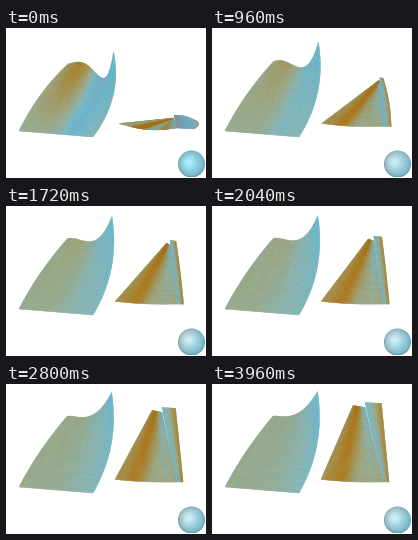
Recreate the animation shown at these times as a matplotlib script. Size 200x150 px, loop 4000 ms.

```python
import numpy as np
import matplotlib.pyplot as plt
from matplotlib.animation import FuncAnimation
from matplotlib.collections import PolyCollection
from matplotlib.patches import Circle

W, H = 200, 150
FRAMES, STEP = 100, 40
STOPS = [0, 0.25, 0.5, 0.75, 1, 1.5]
RAMP = np.array([(180, 124, 26), (170, 148, 76), (160, 174, 138),
                 (140, 187, 185), (108, 192, 217), (150, 155, 165)]) / 255


def shade(tone):
    return np.stack([np.interp(tone, STOPS, RAMP[:, c]) for c in range(3)], axis=-1)


def decay(t, tau):
    return np.exp(-t / tau)


def smooth(s):
    s = np.clip(s, 0, 1)
    return s * s * (3 - 2 * s)


def bump(x, width):
    return np.exp(-(x / width) ** 2)


def arc(top, mid, bottom, v):
    """Parabola through three points, at v = 0, 0.5 and 1."""
    weights = (2 * (v - 0.5) * (v - 1), 4 * v * (1 - v), 2 * v * (v - 0.5))
    return sum(w[..., None] * np.array(p) for w, p in zip(weights, (top, mid, bottom)))


def line(top, bottom, v):
    return arc(top, np.add(top, bottom) / 2, bottom, v)


def ruled(left, right, u):
    return left + (right - left) * u[..., None]


def cloth(u, v, t):
    d = decay(t, 1100)
    left = arc((61 + d, 32 + 4 * d), (34.5, 67), (13, 103), v)
    right = arc((105.5 + 2 * d, 7 + 17 * d), (105 + 2 * d, 60 + 8 * d), (87, 109), v)
    xy = ruled(left, right, u)
    sag = (45 + 230 * d) * u ** (1.2 + 2.6 * d) * (1 - u)
    xy[..., 1] += sag * (1 - v) ** 1.5
    ripple = 0.45 * bump(u - 0.7, 0.15) - 0.5 * (1 - v) * bump(u - 0.3, 0.25)
    return xy, 0.55 + 0.5 * u**3 * (1 - 0.5 * v) + d * ripple


def ridge(t):
    """Apex of the wing, and the top and foot of the ridge beside it."""
    y = 17 + 72 * decay(t, 1300)
    opened = smooth((t - 800) / 2800)
    x = 167 - 26 * opened
    return (x, y + 1), (x + 1 + 11 * opened, y + 3), (171, 98 + 2 * decay(t, 500))


def wing(u, v, t):
    d = decay(t, 500)
    apex, top, foot = ridge(t)
    xy = ruled(line(apex, (109 + 4 * d, 95.5), v), line(top, foot, v), u)
    xy[..., 1] += (1 + 3 * d) * v * np.sin(np.pi * u)
    tone = (0.27 - 0.35 * bump(u - 0.35, 0.2) + 0.3 * v * bump(u - 0.55, 0.25)
            + 0.6 * (1 - 0.7 * v) * bump(u - 0.88, 0.16))
    return xy, tone + 0.3 * d * np.sin(14 * u)


def fold(u, v, t):
    d = decay(t, 600)
    _, top, foot = ridge(t)
    y = top[1] - 5
    left = line((top[0], y), foot, v)
    right = line((169.5 + 9 * d, y + 1), (177 + 11 * d, 98 + 3 * d), v)
    right[..., 0] += 9 * d * np.sin(np.pi * v)
    return ruled(left, right, u), 1 - 0.9 * u + 0.5 * d


class Sheet:
    def __init__(self, ax, form, nu, nv, z):
        self.form = form
        self.u, self.v = np.meshgrid(np.linspace(0, 1, nu + 1), np.linspace(0, 1, nv + 1))
        self.mesh = PolyCollection([], linewidths=0.3, zorder=z)
        ax.add_collection(self.mesh)

    def pose(self, t):
        xy, tone = self.form(self.u, self.v, t)
        quads = np.stack([xy[:-1, :-1], xy[:-1, 1:], xy[1:, 1:], xy[1:, :-1]], axis=2)
        rgb = shade((tone[:-1, :-1] + tone[1:, 1:]) / 2).reshape(-1, 3)
        self.mesh.set_verts(quads.reshape(-1, 4, 2))
        self.mesh.set_facecolor(rgb)
        self.mesh.set_edgecolor(rgb * 0.9)


fig = plt.figure(figsize=(W / 100, H / 100), dpi=100, facecolor="white")
ax = fig.add_axes([0, 0, 1, 1])
ax.axis("off")
sheets = [Sheet(ax, cloth, 34, 36, 1), Sheet(ax, wing, 26, 36, 2), Sheet(ax, fold, 8, 36, 3)]

# Shaded ball
CX, CY, R = 185.5, 136, 13.5
gy, gx = np.mgrid[-1:1:60j, -1:1:60j]
depth = np.sqrt(np.clip(1 - gx**2 - gy**2, 0, 1))[..., None]
side = np.clip(0.5 + 0.5 * gx + 0.3 * gy, 0, 1)[..., None]


def ball_pixels(pale):
    rim, cyan, grey = np.array([(96, 146, 162), (138, 205, 222), (188, 206, 208)]) / 255
    body = cyan + (grey - cyan) * pale * (1 - side)
    glow = 0.14 * bump(np.hypot(gx + 0.2, gy + 0.1), 0.5)[..., None]
    return np.clip(rim + (body - rim) * depth**0.6 + glow, 0, 1)


ball = ax.imshow(ball_pixels(0), extent=(CX - R, CX + R, CY + R, CY - R),
                 interpolation="bilinear", aspect="auto", zorder=4)
ball.set_clip_path(Circle((CX, CY), R, transform=ax.transData))
ax.set_xlim(0, W)
ax.set_ylim(H, 0)


def draw(frame):
    t = frame * STEP
    for sheet in sheets:
        sheet.pose(t)
    ball.set_data(ball_pixels(1 - decay(t, 150)))
    return [s.mesh for s in sheets] + [ball]


anim = FuncAnimation(fig, draw, frames=FRAMES, interval=STEP, repeat=True,
                     repeat_delay=0, blit=False)
plt.show()
```
